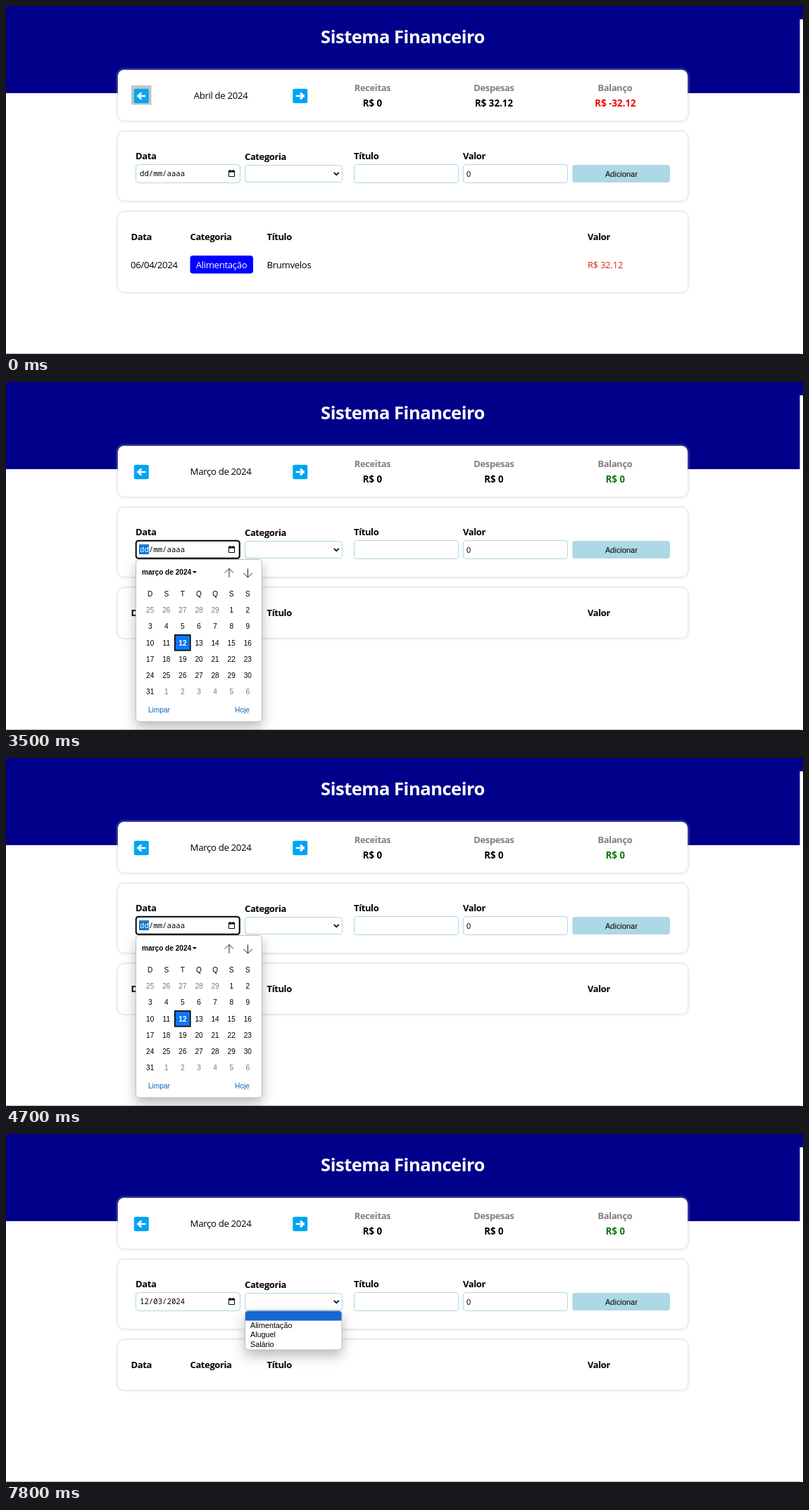
An HTML page that plays this animation: 1132 by 495 pixels, repeating every 8 s.

```html
<!DOCTYPE html>
<html lang="pt-BR">
<head>
<meta charset="utf-8">
<title>Sistema Financeiro</title>
<style>
  html, body { margin: 0; width: 100%; height: 100%; overflow: hidden; background: #fff; }
  svg { display: block; width: 1132px; height: 495px; }
  text { font: 13.2px "Open Sans", "Noto Sans", sans-serif; letter-spacing: -.025em; white-space: pre; }
  .b { font-weight: 700; font-size: 13px; letter-spacing: -.03em; }
  .sum { font-weight: 700; font-size: 13.3px; letter-spacing: 0; }
  .title { font-weight: 700; font-size: 25.6px; letter-spacing: -.02em; fill: #fff; }
  .ui { font: 11.1px "Liberation Sans", Arial, sans-serif; letter-spacing: 0; }
  .cal { font: 10.1px "Liberation Sans", Arial, sans-serif; letter-spacing: 0; }
  .opt { font: 10.8px "Liberation Sans", Arial, sans-serif; letter-spacing: 0; }
  .mono { font: 10.7px "Noto Sans Mono", "DejaVu Sans Mono", monospace; letter-spacing: 0; }
  .mid { text-anchor: middle; }
  .grey { fill: #808080; }
  .link { fill: #0a66b8; }
  .card { fill: #fff; filter: drop-shadow(0 0 2px #c4c4c4); }
  .field { fill: #fff; stroke: #add8e6; }
  .popup { fill: #fff; stroke: #bdbdbd; filter: drop-shadow(0 8px 9px #0004); }
</style>
</head>
<body>
<svg viewBox="0 0 1132 495">
  <path d="M0 0H1132V19H1127.5V124H0Z" fill="#00008b"/>
  <path d="M0 494.5H1128" stroke="#b8b8b8"/>
  <text class="title mid" x="563.5" y="53">Sistema Financeiro</text>

  <rect class="card" x="159" y="91" width="809" height="72" rx="8.5"/>
  <rect class="card" x="159" y="179" width="809" height="98" rx="8.5"/>
  <rect class="card" id="list" x="159" y="293" width="809" height="114" rx="8.5"/>

  <rect id="hover" x="178" y="113" width="28.5" height="27.5"/>
  <defs>
    <g id="arrow">
      <rect x="-10.5" y="-10.3" width="21" height="20.6" rx="2.5" fill="#03a5f0"/>
      <path d="M-6 0H5M0 -4.5L5 0L0 4.5" fill="none" stroke="#fff" stroke-width="2.5"/>
    </g>
  </defs>
  <use href="#arrow" transform="translate(192.3 128) scale(-1 1)"/>
  <use href="#arrow" transform="translate(417.8 128)"/>
  <text class="mid" id="month" x="305" y="132"></text>
  <g class="mid">
    <text class="b grey" x="520.5" y="121">Receitas</text>
    <text class="b grey" x="693" y="121">Despesas</text>
    <text class="b grey" x="865" y="121">Balanço</text>
    <text class="sum" x="520.5" y="143">R$ 0</text>
    <text class="sum" id="spent" x="693" y="143"></text>
    <text class="sum" id="balance" x="865.5" y="143"></text>
  </g>

  <text class="b" x="184" y="218">Data</text>
  <text class="b" x="339" y="219">Categoria</text>
  <text class="b" x="494" y="218">Título</text>
  <text class="b" x="649" y="218">Valor</text>
  <rect class="field" x="184.5" y="225.5" width="148" height="26" rx="3.5"/>
  <rect class="field" x="339.5" y="226.5" width="138" height="24" rx="3.5"/>
  <rect class="field" x="494.5" y="225.5" width="148" height="26" rx="3.5"/>
  <rect class="field" x="649.5" y="225.5" width="148" height="26" rx="3.5"/>
  <rect x="804.5" y="226" width="138.5" height="25" rx="3.5" fill="#add8e6"/>
  <text class="ui" x="654" y="242.5">0</text>
  <text class="ui mid" x="874" y="242.5">Adicionar</text>
  <path d="M465.8 236.8L469.3 240.3L472.8 236.8" fill="none" stroke="#000" stroke-width="1.7"/>
  <path d="M316.5 235H324.5V242.5H316.5Z" fill="none" stroke="#000"/>
  <path d="M316 234H325V236.5H316ZM317.5 233H319V234H317.5ZM322 233H323.5V234H322Z"/>
  <g id="focus">
    <rect x="184.7" y="225.8" width="147" height="25" rx="3.5" fill="none" stroke="#000" stroke-width="2"/>
    <rect x="189" y="231" width="14" height="14" fill="#0078d7"/>
  </g>
  <text class="mono" x="190" y="242"><tspan id="day"></tspan><tspan id="rest"></tspan></text>

  <text class="b" x="177.5" y="333">Data</text>
  <text class="b" x="261.5" y="333">Categoria</text>
  <text class="b" x="370.5" y="333">Título</text>
  <text class="b" x="826" y="333">Valor</text>
  <g id="row">
    <text x="177" y="373">06/04/2024</text>
    <rect x="261.5" y="355" width="89.5" height="25.5" rx="4" fill="#00f"/>
    <text class="mid" x="306" y="373" fill="#fff">Alimentação</text>
    <text x="370.5" y="373">Brumvelos</text>
    <text x="826" y="373" fill="#d9291f">R$ 32.12</text>
  </g>

  <g id="calendar">
    <rect class="popup" x="184.5" y="252.5" width="179" height="230.5" rx="4.5"/>
    <text class="cal" x="193" y="274" style="font-weight:700">março de 2024</text>
    <path d="M264.8 269H271L267.9 272.3Z"/>
    <path d="M317 278V265.5M311 271.5L317 265.5L323 271.5M343.5 265.5V278M337.5 272L343.5 278L349.5 272" fill="none" stroke="#222"/>
    <rect x="239.8" y="359.8" width="22" height="22" fill="#0d76f5" stroke="#000" stroke-width="1.6"/>
    <g id="days" class="mid"></g>
    <text class="cal link" x="202" y="469.5">Limpar</text>
    <text class="cal link" x="325" y="469.5">Hoje</text>
  </g>

  <g id="options">
    <rect class="popup" x="339.5" y="251.5" width="137.5" height="55.5" rx="4"/>
    <path d="M340 265.5V255.5Q340 252 343.5 252H473Q476.5 252 476.5 255.5V265.5Z" fill="#1967d2"/>
    <text class="opt" x="347" y="275.7">Alimentação</text>
    <text class="opt" x="347" y="289.2">Aluguel</text>
    <text class="opt" x="347" y="302.8">Salário</text>
  </g>
</svg>
<script>
const $ = id => document.getElementById(id);
const show = (id, on) => $(id).style.display = on ? "" : "none";
const LOOP = 8000, MONTH = 2100, OPEN = 3400, PICK = 6600, SELECT = 7500;

function cell(label, col, y, style = "") {
  return `<text class="cal" x="${204.7 + 23.1 * col}" y="${y}" style="${style}">${label}</text>`;
}

// Six weeks starting on Sunday, 25 February 2024
let cells = [..."DSTQQSS"].map((d, i) => cell(d, i, 304.5)).join("");
for (let i = 0; i < 42; i++) {
  const date = new Date(2024, 1, 25 + i), day = date.getDate(), march = date.getMonth() === 2;
  const style = !march ? "fill:#777" : day === 12 ? "fill:#fff;font-weight:700" : "";
  cells += cell(day, i % 7, 328.3 + 23.1 * Math.floor(i / 7), style);
}
$("days").innerHTML = cells;

function draw(now) {
  const t = now % LOOP;
  const april = t < MONTH, picked = t >= PICK, focused = t >= OPEN && t < SELECT;

  $("month").textContent = april ? "Abril de 2024" : "Março de 2024";
  $("spent").textContent = april ? "R$ 32.12" : "R$ 0";
  $("balance").textContent = april ? "R$ -32.12" : "R$ 0";
  $("balance").style.fill = april ? "#ee0505" : "#0a7a0a";
  $("list").setAttribute("height", april ? 114 : 71);
  show("row", april);

  show("hover", t < 2400);
  $("hover").style.fill = t >= 2000 && april ? "#3e66c8" : "#c3c3c3";

  $("day").textContent = picked ? "12" : "dd";
  $("day").style.fill = focused ? "#fff" : "#000";
  $("rest").textContent = picked ? "/03/2024" : "/mm/aaaa";
  show("focus", focused);
  show("calendar", t >= OPEN && !picked);
  show("options", t >= SELECT);
  requestAnimationFrame(draw);
}
draw(performance.now());
</script>
</body>
</html>
```
